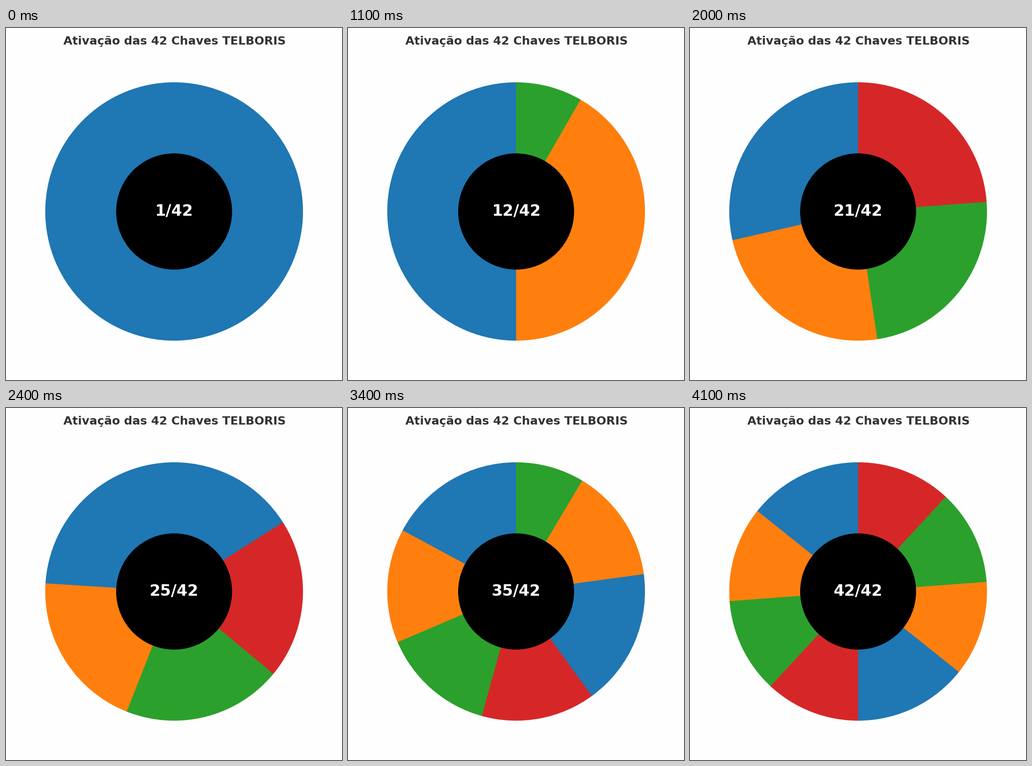
Write a matplotlib script that moves like this. It is 732x765 px and loops after 4.2 s.

```python
import matplotlib.pyplot as plt
from matplotlib.animation import FuncAnimation
from matplotlib.patches import Circle, Wedge

W, H, DPI = 732, 765, 100
TOTAL = 42
CYCLE = 21
CENTER = (366.25, H - 398.75)
OUTER, INNER = 280.75, 126.3
COLORS = ["#1f77b4", "#ff7f0e", "#2ca02c", "#d62728"]
OVERLAP = 0.5  # degrees tucked under the neighbour to hide seams

plt.rcParams["font.family"] = "DejaVu Sans"
fig = plt.figure(figsize=(W / DPI, H / DPI), dpi=DPI, facecolor="#fefefe")
ax = fig.add_axes([0, 0, 1, 1])
ax.set_xlim(0, W)
ax.set_ylim(0, H)
ax.axis("off")

ax.text(125, H - 36, "Ativação das 42 Chaves TELBORIS", fontsize=18.2,
        weight="bold", color="#333333", ha="left", va="baseline")
ax.add_patch(Circle(CENTER, INNER, facecolor="black", linewidth=0, zorder=3))
counter = ax.text(*CENTER, "", fontsize=24.4, weight="bold", color="white",
                  ha="center", va="center", zorder=4)
wedges = []


def color_index(key):
    return key % CYCLE * len(COLORS) // CYCLE


def color_runs(count):
    """Merge neighbouring keys of one colour into (first, end, colour) runs."""
    first = 0
    for key in range(1, count + 1):
        if key == count or color_index(key) != color_index(first):
            yield first, key, COLORS[color_index(first)]
            first = key


def draw(frame):
    count = frame + 1
    while wedges:
        wedges.pop().remove()
    for first, end, color in color_runs(count):
        start = 90 + 360 * first / count
        stop = 90 + 360 * end / count
        if end < count:
            stop += OVERLAP
            if first == 0:
                start -= OVERLAP
        wedge = Wedge(CENTER, OUTER, start, stop, facecolor=color, linewidth=0)
        wedges.append(ax.add_patch(wedge))
    counter.set_text(f"{count}/{TOTAL}")
    return [*wedges, counter]


anim = FuncAnimation(fig, draw, frames=TOTAL, interval=100,
                     init_func=lambda: draw(0), repeat=True, repeat_delay=0)
plt.show()
```
